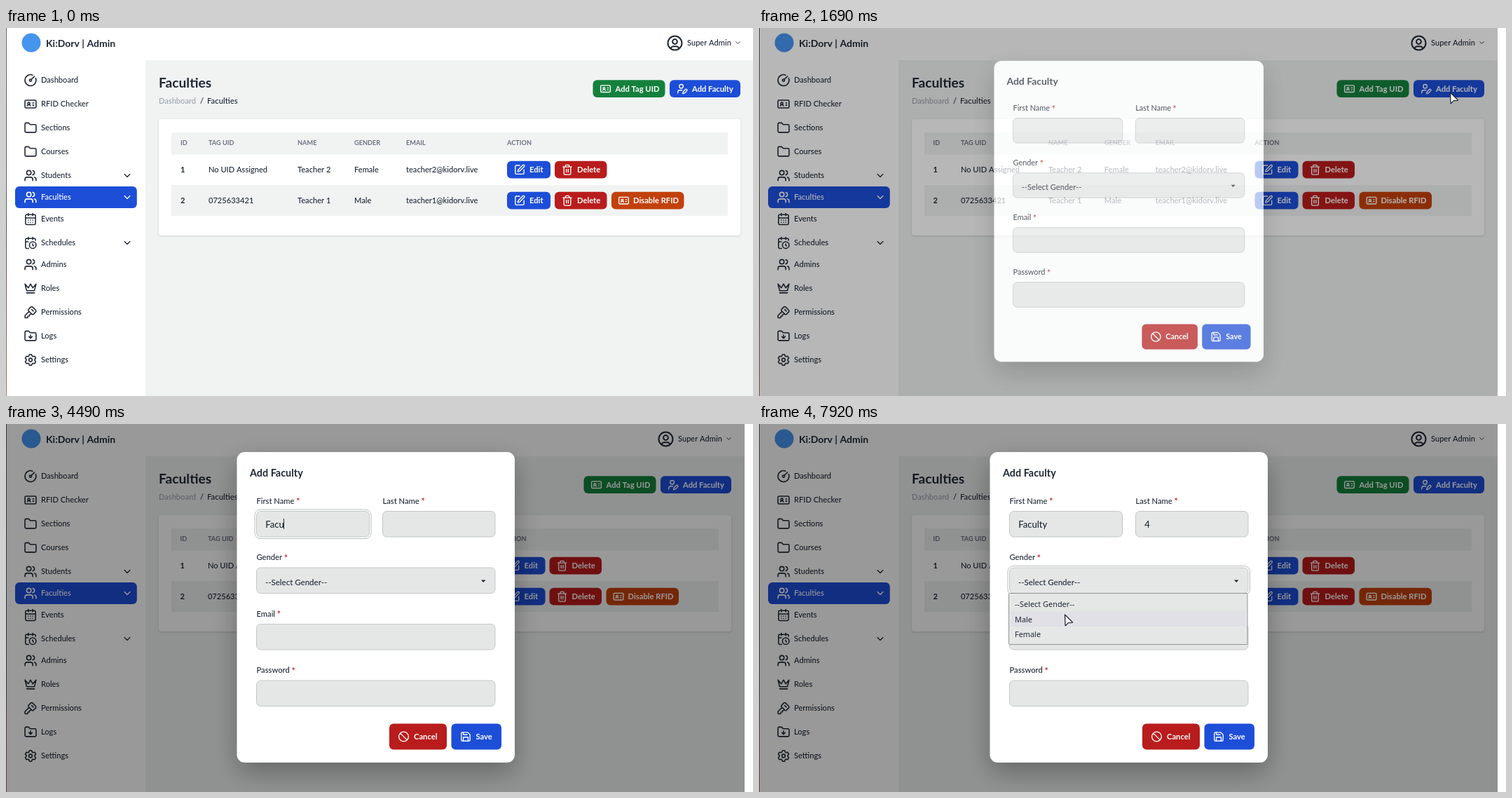
Animation, 1066 px wide and 525 px high, one loop 8000 ms. Source, as an HTML page with a canvas:

```html
<!DOCTYPE html>
<html lang="en">
<head>
<meta charset="utf-8">
<title>Faculties</title>
<style>
  html, body { margin: 0; width: 100%; height: 100%; overflow: hidden; background: #fff; }
  canvas { display: block; }
</style>
</head>
<body>
<canvas id="stage" width="1066" height="525"></canvas>
<script>
const W = 1066, H = 525, LOOP = 8000, TICK = 70;
const INK = '#1f2937', BLUE = '#1d4ed8', RED = '#b91c1c', GREEN = '#15803d', ORANGE = '#c2410c';
const PAGE = '#f1f3f3', FIELD = '#e5e7e6', LINE = '#c3c7c9', MUTED = '#6b7280';

const stage = document.getElementById('stage').getContext('2d');
const layer = document.createElement('canvas');
layer.width = W;
layer.height = H;
const sheet = layer.getContext('2d');
let g = stage;

const clamp = u => Math.max(0, Math.min(1, u));
const ease = u => u * u * (3 - 2 * u);
const circ = (x, y, r) => `M${x - r} ${y}a${r} ${r} 0 1 0 ${2 * r} 0a${r} ${r} 0 1 0 ${-2 * r} 0`;

function gear() {
  const pts = [];
  for (let i = 0; i < 6; i++) {
    for (const [off, r] of [[-23, 7.6], [-11, 10], [11, 10], [23, 7.6]]) {
      const a = (i * 60 - 90 + off) * Math.PI / 180;
      pts.push(`${12 + r * Math.cos(a)} ${12 + r * Math.sin(a)}`);
    }
  }
  return `M${pts.join('L')}Z` + circ(12, 12, 3);
}

const folder = 'M20 20a2 2 0 0 0 2-2V8a2 2 0 0 0-2-2h-7.9a2 2 0 0 1-1.7-.9L9.6 3.9A2 2 0 0 0 7.9 3H4a2 2 0 0 0-2 2v13a2 2 0 0 0 2 2Z';
const shapes = {
  gauge: 'M15.6 2.7a10 10 0 1 0 5.7 5.7M13.4 10.6 19 5' + circ(12, 12, 2),
  card: 'M4 5h16a2 2 0 0 1 2 2v10a2 2 0 0 1-2 2H4a2 2 0 0 1-2-2V7a2 2 0 0 1 2-2zM16 10h2M16 14h2M6.2 15a3 3 0 0 1 5.6 0' + circ(9, 11, 2),
  folder,
  inbox: folder + 'M12 10v6m3-3-3 3-3-3',
  users: 'M16 21v-2a4 4 0 0 0-4-4H6a4 4 0 0 0-4 4v2M22 21v-2a4 4 0 0 0-3-3.9M16 3.1a4 4 0 0 1 0 7.8' + circ(9, 7, 4),
  days: 'M8 2v4M16 2v4M5 4h14a2 2 0 0 1 2 2v14a2 2 0 0 1-2 2H5a2 2 0 0 1-2-2V6a2 2 0 0 1 2-2zM3 10h18M8 14h.01M12 14h.01M16 14h.01M8 18h.01M12 18h.01M16 18h.01',
  clock: 'M21 7.5V6a2 2 0 0 0-2-2H5a2 2 0 0 0-2 2v14a2 2 0 0 0 2 2h3.5M16 2v4M8 2v4M3 10h5M17.5 17.5 16 16.3V14' + circ(16, 16, 6),
  crown: 'm2 4 3 12h14l3-12-6 7-4-7-4 7-6-7zm3 16h14',
  key: 'M12.4 2.7a2.5 2.5 0 0 1 3.4 0l5.5 5.5a2.5 2.5 0 0 1 0 3.4l-3.7 3.7a2.5 2.5 0 0 1-3.4 0L8.7 9.8a2.5 2.5 0 0 1 0-3.4zM14 7l3 3M9.4 10.6l-6.8 6.8A2 2 0 0 0 2 18.8V21a1 1 0 0 0 1 1h3a1 1 0 0 0 1-1v-1a1 1 0 0 1 1-1h1a1 1 0 0 0 1-1v-1a1 1 0 0 1 1-1h.2a2 2 0 0 0 1.4-.6l.8-.8',
  gear: gear(),
  person: 'M6 19.6a4.5 4.5 0 0 1 4-2.8h4a4.5 4.5 0 0 1 4 2.8' + circ(12, 10, 3.4) + circ(12, 12, 10),
  userPen: 'M11.5 15H7a4 4 0 0 0-4 4v2M21.4 16.6a1 1 0 0 0-3-3l-4 4a2 2 0 0 0-.5.9l-.9 2.9a.5.5 0 0 0 .6.6l2.9-.9a2 2 0 0 0 .9-.5z' + circ(10, 7, 4),
  pen: 'M12 3H5a2 2 0 0 0-2 2v14a2 2 0 0 0 2 2h14a2 2 0 0 0 2-2v-7M18.4 2.6a1 1 0 0 1 3 3l-9 9a2 2 0 0 1-.9.5l-2.9.9a.5.5 0 0 1-.6-.6l.9-2.9a2 2 0 0 1 .5-.9z',
  trash: 'M3 6h18M19 6v14a2 2 0 0 1-2 2H7a2 2 0 0 1-2-2V6M8 6V4a2 2 0 0 1 2-2h4a2 2 0 0 1 2 2v2M10 11v6M14 11v6',
  ban: 'm4.9 4.9 14.2 14.2' + circ(12, 12, 10),
  save: 'M15.2 3a2 2 0 0 1 1.4.6l3.8 3.8a2 2 0 0 1 .6 1.4V19a2 2 0 0 1-2 2H5a2 2 0 0 1-2-2V5a2 2 0 0 1 2-2zM17 21v-7a1 1 0 0 0-1-1H8a1 1 0 0 0-1 1v7M7 3v4a1 1 0 0 0 1 1h7',
  chevron: 'm6 9 6 6 6-6'
};
const icons = {};
for (const k in shapes) icons[k] = new Path2D(shapes[k]);

const arrow = new Path2D('M0 0L.6 15.2Q.8 16 1.4 15.3L4.7 11.6L10.4 11.3Q11.2 11.1 10.6 10.5Z');
const hand = new Path2D('M-1.5 9.5V1.5a1.5 1.5 0 0 1 3 0V6.3l3.8.8q2.3.5 2.1 2.7l-.6 3.6q-.4 2.6-3 2.6H2q-1.6 0-2.6-1.3l-3.8-4.6q-.3-1.6 1.3-1.5z');
const beam = new Path2D('M-2.5-5.5h5M0-5.5v11M-2.5 5.5h5');

function text(s, x, y, size = 11.1, color = INK, weight = 500, family = 'Lato') {
  g.font = `${weight} ${size}px ${family}, sans-serif`;
  g.fillStyle = color;
  g.fillText(s, x, y + size * .36);
  return g.measureText(s).width;
}

function box(x, y, w, h, r, fill, stroke) {
  g.beginPath();
  g.roundRect(x, y, w, h, r);
  if (fill) { g.fillStyle = fill; g.fill(); }
  if (stroke) { g.strokeStyle = stroke; g.lineWidth = 1; g.stroke(); }
}

function shaded(blur, dy, alpha, draw) {
  g.save();
  g.shadowColor = `rgba(0,0,0,${alpha})`;
  g.shadowBlur = blur;
  g.shadowOffsetY = dy;
  draw();
  g.restore();
}

function icon(name, cx, cy, size, color = INK) {
  g.save();
  g.translate(cx - size / 2, cy - size / 2);
  g.scale(size / 24, size / 24);
  g.strokeStyle = color;
  g.lineWidth = 2;
  g.lineCap = g.lineJoin = 'round';
  g.stroke(icons[name]);
  g.restore();
}

function button(label, name, x, y, w, h, fill, pad = 18, gap = 32) {
  box(x, y, w, h, 6, fill);
  icon(name, x + pad, y + h / 2, 16.5, '#fff');
  text(label, x + gap, y + h / 2, 11.2, '#fff', 700);
}

const menu = [
  ['Dashboard', 'gauge', 74.5], ['RFID Checker', 'card', 108.5], ['Sections', 'folder', 142.5],
  ['Courses', 'folder', 176.5], ['Students', 'users', 210.5, 1], ['Faculties', 'users', 241.5, 1],
  ['Events', 'days', 272.5], ['Schedules', 'clock', 306.5, 1], ['Admins', 'users', 337.5],
  ['Roles', 'crown', 371.5], ['Permissions', 'key', 405.5], ['Logs', 'inbox', 439.5],
  ['Settings', 'gear', 473.5]
];
const heads = [['ID', 249], ['TAG UID', 289], ['NAME', 416], ['GENDER', 497], ['EMAIL', 571], ['ACTION', 715]];
const rows = [
  ['1', 'No UID Assigned', 'Teacher 2', 'Female', 'teacher2@kidorv.live'],
  ['2', '0725633421', 'Teacher 1', 'Male', 'teacher1@kidorv.live']
];

function sidebar() {
  g.fillStyle = '#fff';
  g.fillRect(0, 46, 199, H);
  const edge = g.createLinearGradient(0, 0, 0, H);
  edge.addColorStop(0, '#5b6470');
  edge.addColorStop(.55, '#50505c');
  edge.addColorStop(1, '#a8685e');
  g.fillStyle = edge;
  g.fillRect(0, 0, 1, H);
  box(13, 226, 173.8, 31, 6, BLUE);
  for (const [label, name, y, more] of menu) {
    const color = label === 'Faculties' ? '#fff' : INK;
    icon(name, 35, y, 19, color);
    text(label, 50, y, 11.1, color);
    if (more) icon('chevron', 173, y, 15.5, color);
  }
}

function header(dx) {
  g.fillStyle = '#fff';
  g.fillRect(0, 0, W, 46);
  g.fillStyle = '#4694ee';
  g.beginPath();
  g.arc(36, 21, 13.5, 0, 7);
  g.fill();
  text('Ki:Dorv | Admin', 57, 21.5, 14, INK, 700);
  icon('person', 954.5 - dx, 21.5, 24);
  text('Super Admin', 972 - dx, 21.5);
  icon('chevron', 1044.5 - dx, 21, 11);
}

function mainArea(dx, hover) {
  const col = x => dx ? 218 + (x - 218) * .985 : x;
  text('Faculties', 218, 78, 19.2, INK, 700);
  text('Dashboard', 218, 104, 11.1, '#9ca3af');
  text('/', 277, 104);
  text('Faculties', 287, 104, 11.3);

  button('Add Tag UID', 'card', 837.5 - dx, 74.3, 103, 24.8, GREEN);
  const mix = (a, b) => Math.round(a + (b - a) * hover);
  g.save();
  g.translate(997.5 - dx, 86.7);
  g.scale(1 - .03 * hover, 1 - .03 * hover);
  button('Add Faculty', 'userPen', -50.5, -12.4, 101, 24.8, `rgb(${mix(29, 59)},${mix(78, 130)},${mix(216, 246)})`);
  g.restore();

  shaded(3, 1, .14, () => box(218, 130, 830 - dx, 166, 4, '#fff'));
  g.fillStyle = PAGE;
  g.fillRect(236, 149, 794 - dx, 31.5);
  g.fillRect(236, 224, 794 - dx, 44);
  for (const [label, x] of heads) text(label, col(x), 164, 9.2, MUTED, 700);
  rows.forEach((cells, r) => {
    const y = 202 + r * 44;
    cells.forEach((s, i) => text(s, col(heads[i][1]), y + .5, 11.1, INK, i ? 500 : 700));
    const x = col(715);
    button('Edit', 'pen', x, y - 12.2, 62, 24.8, BLUE);
    button('Delete', 'trash', x + 68, y - 12.2, 74.5, 24.8, RED);
    if (r) button('Disable RFID', 'card', x + 149, y - 12.2, 103.5, 24.8, ORANGE, 17.5, 31);
  });
}

function page(t, open) {
  const dx = open ? 13 : 0;
  g.fillStyle = PAGE;
  g.fillRect(0, 0, W, H);
  header(dx);
  sidebar();
  mainArea(dx, open ? 0 : clamp((t - 1410) / 210));
  if (open) {
    g.fillStyle = '#fff';
    g.fillRect(1054, 0, 12, H);
  }
}

const keys = [3930, 4210, 4350, 4490, 4700, 4770, 4910];
const fields = [
  ['First Name', 357.5, 124.5, 161], ['Last Name', 537.5, 124.5, 160.5],
  ['Gender', 357.5, 205, 340.5], ['Email', 357.5, 285.5, 340.5], ['Password', 357.5, 366, 340.5]
];

function form(t) {
  const first = 'Faculty'.slice(0, keys.filter(k => t >= k).length);
  const last = t >= 5540 ? '4' : '';
  const focus = t < 3020 ? -1 : t < 5120 ? 0 : t < 5750 ? 1 : 2;
  const values = [first, last];

  text('Add Faculty', 348, 70, 14.4, INK, 700);
  fields.forEach(([label, x, y, w], i) => {
    const lw = text(label, x, y - 15, 11.2);
    text('*', x + lw + 2.5, y - 14, 13.5, RED);
    box(x, y, w, 36.5, 6, FIELD, LINE);
    if (i === focus) box(x - 2.5, y - 2.5, w + 5, 41.5, 8, null, '#b9bdc0');
    if (i > 1) return;
    const tw = text(values[i], x + 12.8, y + 18.5, 13);
    const lit = i || t < 3510 || t >= 3930;
    if (i === focus && lit) {
      g.fillStyle = INK;
      g.fillRect(Math.round(x + 12.5 + tw), y + 10.5, 1, 15);
    }
  });
  text('--Select Gender--', 370, 225.5, 11.5);
  g.fillStyle = INK;
  g.beginPath();
  g.moveTo(678, 222.5);
  g.lineTo(684.5, 222.5);
  g.lineTo(681.2, 226);
  g.fill();
  button('Cancel', 'ban', 547, 427.5, 82, 37, RED, 20.5, 35);
  button('Save', 'save', 635.5, 427.5, 71.5, 37, BLUE, 20.5, 35);
}

function options(t) {
  if (t < 7500) return;
  g.globalAlpha = t < 7570 ? .6 : 1;
  box(356.5, 241.5, 340.5, 73, 1, FIELD, '#8f9296');
  g.fillStyle = '#e0e0e6';
  g.fillRect(359, t < 7850 ? 246 : 267.5, 335, 21.5);
  ['--Select Gender--', 'Male', 'Female'].forEach((s, i) =>
    text(s, 365, 257 + i * 21.7, 10.9, INK, 400, '"Noto Sans"'));
  g.globalAlpha = 1;
}

function modal(t) {
  const p = [.7, .925][Math.round((t - 1690) / TICK)] || 1;
  const size = .9 + .1 * p;
  g = sheet;
  g.clearRect(0, 0, W, H);
  g.fillStyle = 'rgba(0,0,0,.4)';
  g.fillRect(0, 0, 1054, H);
  g.save();
  g.translate(527.6, 261.7);
  g.scale(size, size);
  g.translate(-527.6, -261.7);
  shaded(38, 14, .3, () => box(329.5, 40, 396.5, 443, 11, '#fff'));
  form(t);
  options(t);
  g.restore();
  g = stage;
  g.globalAlpha = p;
  g.drawImage(layer, 0, 0);
  g.globalAlpha = 1;
}

// Each leg: start, end, then from, bend and to points.
const legs = [
  [570, 1410, 983, 485, 915, 290, 986, 92],
  [1900, 1970, 986, 92, 983, 93, 980, 94],
  [2040, 2810, 980, 94, 760, 255, 413, 155.5],
  [6940, 7290, 413, 155.5, 425, 205, 452, 236],
  [7710, 7920, 452, 236, 448, 258, 436, 272]
];

function pointer(t, open) {
  if (t < 500 || (t >= 4000 && t < 7010)) return;
  const [a, b, x0, y0, cx, cy, x1, y1] = legs.filter(l => t >= l[0]).pop() || legs[0];
  const u = ease(clamp((t - a) / (b - a))), v = 1 - u;
  const x = v * v * x0 + 2 * u * v * cx + u * u * x1;
  const y = v * v * y0 + 2 * u * v * cy + u * u * y1;
  const typing = open && y > 124 && y < 161 && ((x > 357 && x < 518) || (x > 537 && x < 698));
  g.save();
  g.lineJoin = 'round';
  g.strokeStyle = INK;
  g.fillStyle = '#fff';
  if (typing) {
    g.translate(x + .5, y);
    g.lineWidth = 1;
    g.stroke(beam);
  } else {
    const shape = t >= 1480 && !open ? hand : arrow;
    g.translate(x + .5, y + (shape === hand ? 1.5 : 0));
    g.lineWidth = 1.3;
    g.fill(shape);
    g.stroke(shape);
  }
  g.restore();
}

function draw(t) {
  const open = t >= 1690;
  page(t, open);
  if (open) modal(t);
  pointer(t, open);
}

const start = performance.now();
let shown = null;
function loop() {
  const t = (performance.now() - start) % LOOP;
  const step = Math.floor((t - 10) / TICK) * TICK + 10;
  if (step !== shown) {
    shown = step;
    draw(step);
  }
  requestAnimationFrame(loop);
}
loop();
</script>
</body>
</html>
```
